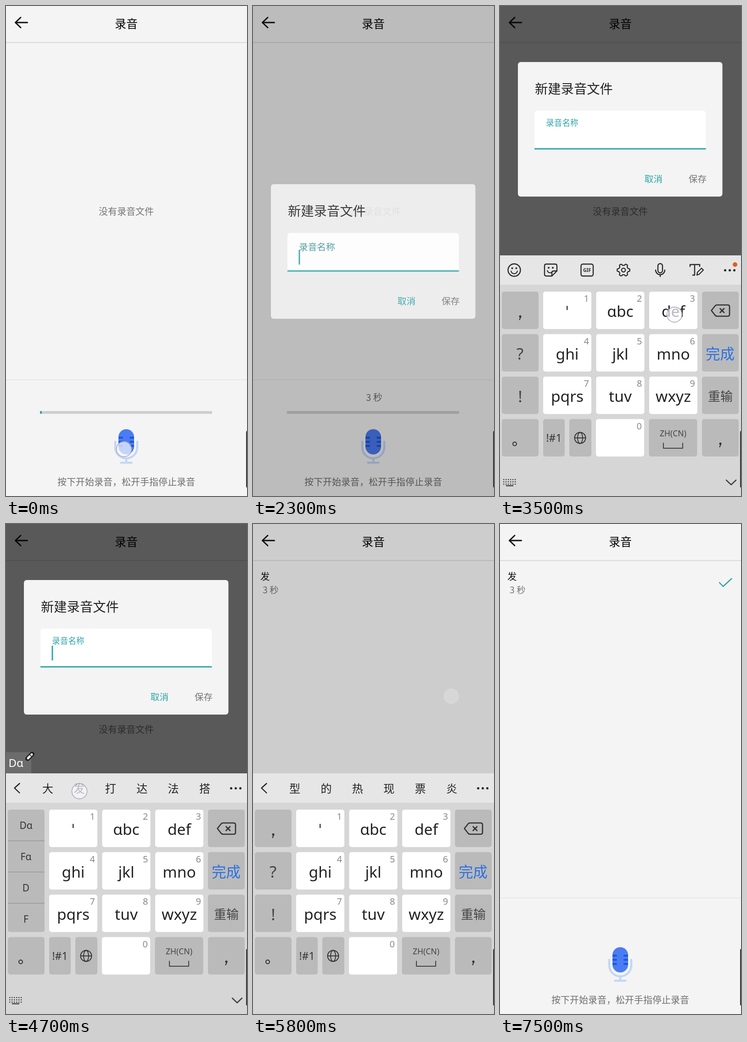
These frames come from a looping animation (525 px wide and 1067 px high, 7800 ms). An HTML page with a canvas:

```html
<!DOCTYPE html>
<html lang="zh-CN">
<head>
<meta charset="utf-8">
<title>录音</title>
<style>
  html, body { margin: 0; width: 100%; height: 100%; overflow: hidden; background: #f4f4f4; }
  canvas { display: block; }
</style>
</head>
<body>
<canvas id="stage" width="525" height="1067"></canvas>
<script>
const g = document.getElementById('stage').getContext('2d');
const LOOP = 7800, STEP = 100;
const TEAL = '#2fa4a9', INK = '#222', GREY = '#757575', PAPER = '#f4f4f4';
const CJK = '"Noto Sans CJK SC", "Noto Sans CJK", sans-serif';
const LATIN = '"Noto Sans", sans-serif';

// Piecewise linear value over time; stops are [time, value].
function track(t, ...stops) {
  if (t <= stops[0][0]) return stops[0][1];
  for (let i = 1; i < stops.length; i++) {
    const [t0, v0] = stops[i - 1], [t1, v1] = stops[i];
    if (t < t1) return v0 + (v1 - v0) * (t - t0) / (t1 - t0);
  }
  return stops[stops.length - 1][1];
}
const within = (t, a, b) => t >= a && t < b;

function rect(x, y, w, h, color) {
  g.fillStyle = color;
  g.fillRect(x, y, w, h);
}
function round(x, y, w, h, r, color) {
  g.beginPath();
  g.roundRect(x, y, w, h, r);
  g.fillStyle = color;
  g.fill();
}
function disc(x, y, r, color) {
  g.beginPath();
  g.arc(x, y, r, 0, 7);
  g.fillStyle = color;
  g.fill();
}
function ring(x, y, r, color, width) {
  g.beginPath();
  g.arc(x, y, r, 0, 7);
  stroke(color, width);
}
function stroke(color, width) {
  g.strokeStyle = color;
  g.lineWidth = width;
  g.stroke();
}
function line(color, width, ...p) {
  g.beginPath();
  for (let i = 0; i < p.length; i += 2) g.lineTo(p[i], p[i + 1]);
  stroke(color, width);
}
// cy is the optical middle of a full-height character
function text(s, x, cy, size, color, align = 'left', font = CJK, weight = 400) {
  g.font = `${weight} ${size}px ${font}`;
  g.textAlign = align;
  g.fillStyle = color;
  g.fillText(s, x, cy + size * 0.38);
}
function faded(alpha, draw) {
  if (alpha <= 0) return;
  g.save();
  g.globalAlpha = alpha;
  draw();
  g.restore();
}

function touch(x, y) {
  disc(x, y, 17, 'rgba(250,250,252,.7)');
  ring(x, y, 16.5, 'rgba(150,148,175,.7)', 1.8);
}

function mic() {
  const pale = '#c3d7f5', dark = '#1f55d8';
  g.beginPath();
  g.moveTo(238, 949);
  g.lineTo(238, 961);
  g.arc(262, 961, 24, Math.PI, 0, true);
  g.lineTo(286, 949);
  stroke(pale, 4.5);
  line(pale, 4.5, 262, 985, 262, 994);
  line(pale, 4.5, 250.5, 994.5, 273.5, 994.5);
  round(245, 921.5, 34, 55, 17, '#4a7cf3');
  for (const y of [940, 949, 958]) {
    round(245, y - 2, 10, 4, [0, 2, 2, 0], dark);
    round(269, y - 2, 10, 4, [2, 0, 0, 2], dark);
  }
}

function screen(t) {
  const saved = t >= 5800;
  rect(0, 0, 525, 1067, PAPER);
  rect(0, 78.5, 525, 2, '#dadada');
  line('#111', 3, 32, 25, 20.5, 36, 32, 47);
  line('#111', 3, 21, 36, 46.5, 36);
  text('录音', 262, 38, 25, '#000', 'center', CJK, 500);
  rect(0, 813, 525, 2, '#e7e7e7');

  if (saved) {
    const glow = track(t, [7000, 0], [7100, .08], [7300, .08], [7500, 0]);
    rect(0, 92, 525, 73, `rgba(0,0,0,${glow})`);
    text('发', 16, 114.5, 20.5, '#111');
    text('3 秒', 21, 144, 19.5, GREY);
    if (t >= 7200) line(TEAL, 2.5, 478, 127.5, 486, 136, 504.5, 119);
  } else {
    text('没有录音文件', 262, 447, 20, GREY, 'center');
    const secs = .64 + Math.min(t, 2200) * .0011;
    if (secs >= 1) text(Math.floor(secs) + ' 秒', 264, 852, 20, '#6e6e6e', 'center');
    rect(74, 882, 375, 6, '#cecece');
    if (t < 2200) rect(74, 882, secs * 6.25, 6, TEAL);
  }
  mic();
  text('按下开始录音，松开手指停止录音', 262, 1036.5, 20, '#6e6e6e', 'center');
}

function dialog(t) {
  const top = track(t, [2400, 388], [2500, 137], [2600, 122]);
  const typed = t >= 4800;
  round(39, top, 445.5, 293, 6, PAPER);
  text('新建录音文件', 76, top + 58, 28.3, INK);
  round(75, top + 106, 373.5, 84, [6, 6, 0, 0], '#fff');
  rect(75, top + 187.5, 373.5, 3, TEAL);
  const k = track(t, [2300, 0], [2400, 1]);
  text('录音名称', 100, top + 137 - 5 * k, 19.7 - 2 * k, k < 1 ? '#3f8f94' : TEAL);
  if (typed) text('发', 100, top + 159, 24, INK);
  const beat = typed ? (t - 4800) % 1000 < 400 || t >= 5600 : (t + 1300) % 1000 < 550;
  if (beat || t < 2700) rect(typed ? 125 : 99.5, top + 143, 3, 32, TEAL);
  text('取消', 334.5, top + 254.5, 19.7, TEAL, 'center');
  text('保存', 430.5, top + 254.5, 19.7, typed ? TEAL : GREY, 'center');
}

function toolIcons() {
  const c = '#2b2b2b', y = 575;
  ring(31, y, 13.5, c, 2.4);
  disc(26.5, y - 4, 2, c);
  disc(35.5, y - 4, 2, c);
  g.beginPath(); g.arc(31, y + 1, 7, .2, 2.94); stroke(c, 2.2);

  g.beginPath();
  g.moveTo(113, y + 13);
  g.lineTo(101, y + 13);
  g.quadraticCurveTo(97, y + 13, 97, y + 9);
  g.lineTo(97, y - 9);
  g.quadraticCurveTo(97, y - 13, 101, y - 13);
  g.lineTo(120, y - 13);
  g.quadraticCurveTo(124, y - 13, 124, y - 9);
  g.lineTo(124, y + 2);
  g.lineTo(113, y + 13);
  g.lineTo(113, y + 6);
  g.quadraticCurveTo(113, y + 2, 117, y + 2);
  g.lineTo(124, y + 2);
  stroke(c, 2.4);
  disc(106, y - 5, 2, c);
  disc(115, y - 5, 2, c);
  g.beginPath(); g.arc(109, y, 6, .8, 2.9); stroke(c, 2.2);

  g.beginPath(); g.roundRect(176.5, y - 13, 26.5, 26, 4); stroke(c, 2.4);
  text('GIF', 189.7, y, 10.5, c, 'center', LATIN, 700);

  g.beginPath();
  for (let i = 0; i <= 64; i++) {
    const a = i * Math.PI / 32, r = 12 + 1.8 * Math.tanh(3 * Math.cos(6 * a));
    g.lineTo(269 + r * Math.cos(a), y + r * Math.sin(a));
  }
  stroke(c, 2.3);
  ring(269, y, 4.2, c, 2.3);

  g.beginPath(); g.roundRect(344, y - 14, 10, 20, 5); stroke(c, 2.4);
  g.beginPath(); g.arc(349, y, 10, 0, Math.PI); stroke(c, 2.4);
  line(c, 2.4, 349, y + 10, 349, y + 14);

  line(c, 2.4, 414, y - 8, 414, y - 12, 435, y - 12, 435, y - 8);
  line(c, 2.4, 424, y - 12, 424, y + 11, 420, y + 11);
  line(c, 2.2, 429, y + 11, 430, y + 5, 439, y - 4, 443, y, 434, y + 9, 429, y + 11);
  disc(512, y - 12, 5, '#dd5f20');
}

function candidates(words) {
  line(INK, 2.4, 29.5, 565, 18.5, 575, 29.5, 585.5);
  [...words].forEach((w, i) => text(w, 91 + 68.4 * i, 575.5, 24, INK, 'center'));
}

function comma(x, y) {
  disc(x, y - 4, 2.5, '#333');
  line('#333', 2, x + 1.2, y - 3, x - 1.5, y + 3);
}

function composing(word) {
  rect(0, 497, 55, 46, '#6c6c6c');
  text(word, 5.5, 519.5, 24, '#fff', 'left', LATIN);
  line('#222', 10, 47, 511, 57, 501);
  line('#eee', 5, 48, 510, 56, 502);
  line('#222', 1.5, 51.5, 502, 56, 506.5);
}

function keys(column) {
  const ROWS = [622, 714.5, 807, 899.5], H = 81.5, DARK = '#bababa';
  const key = (x, row, w, color) => round(x, ROWS[row], w, H, 5, color);
  const letters = ['', 'ɑbc', 'def', 'ghi', 'jkl', 'mno', 'pqrs', 'tuv', 'wxyz'];
  letters.forEach((s, i) => {
    const row = Math.floor(i / 3), x = 94 + 115.5 * (i % 3), y = ROWS[row];
    key(x, row, 105, '#fff');
    text(i + 1, x + 100, y + 14.5, 20, '#8a8a8a', 'right', LATIN);
    text(s, x + 52.5, y + 42.3, 33.5, INK, 'center', LATIN, 500);
  });
  rect(145, 653, 2.4, 9, '#333');

  if (column) {
    round(4, 622, 80, 266.5, 5, DARK);
    column.forEach((s, i) => {
      if (i) rect(4, 621 + 68 * i, 80, 1.5, '#999');
      text(s, 43.5, 656.5 + 67.7 * i, 21, '#333', 'center', LATIN, 500);
    });
  } else {
    for (let r = 0; r < 3; r++) key(4, r, 80, DARK);
    comma(44, 680);
    text('?', 43.5, 756.5, 35, '#444', 'center', LATIN);
    text('!', 44, 849.5, 35, '#444', 'center', LATIN);
  }
  key(4, 3, 80, DARK);
  ring(32, 953.5, 4, '#333', 2);
  key(94, 3, 47, DARK);
  text('!#1', 117.5, 940.5, 23, '#333', 'center', LATIN, 500);
  key(151, 3, 48, DARK);
  ring(174.5, 940.5, 12, '#333', 2);
  g.beginPath(); g.ellipse(174.5, 940.5, 5.5, 12, 0, 0, 7); stroke('#333', 1.8);
  line('#333', 1.8, 163, 940.5, 186, 940.5);
  key(209, 3, 105, '#fff');
  text('0', 309, 914, 20, '#8a8a8a', 'right', LATIN);
  key(324.5, 3, 105, DARK);
  text('ZH(CN)', 377, 930.5, 17.5, '#444', 'center', LATIN);
  line('#444', 2, 356, 952, 356, 963, 398, 963, 398, 952);

  for (let r = 0; r < 4; r++) key(440, r, 80, DARK);
  g.beginPath();
  g.moveTo(460.5, 663);
  g.lineTo(469, 652.5);
  g.quadraticCurveTo(470.5, 651, 473, 651);
  g.lineTo(496, 651);
  g.quadraticCurveTo(500, 651, 500, 655);
  g.lineTo(500, 671.5);
  g.quadraticCurveTo(500, 675.5, 496, 675.5);
  g.lineTo(473, 675.5);
  g.quadraticCurveTo(470.5, 675.5, 469, 674);
  g.closePath();
  stroke('#333', 2.6);
  line('#333', 2.6, 479.5, 659, 488, 667.5);
  line('#333', 2.6, 488, 659, 479.5, 667.5);
  text('完成', 479.5, 757, 31.5, '#2a6fe3', 'center');
  text('重输', 480, 849.5, 27, '#444', 'center');
  comma(480, 957);
}

function keyboard(t) {
  const drop = track(t, [2400, 330], [2500, 5], [2600, 0], [5800, 0], [5900, 300], [6000, 530]);
  const rising = t < 2600;
  const first = within(t, 3600, 4000), second = within(t, 4000, 4800);
  g.save();
  g.translate(0, drop);
  if (first || second) composing(first ? 'D' : 'Dɑ');
  rect(0, 543, 525, 64, rising ? '#e8e1e6' : '#e6e6e6');
  rect(0, 607, 525, 460, '#d6d6d6');
  if (t < 3600) toolIcons();
  else candidates(first ? '的等到大都对' : second ? '大发打达法搭' : '型的热现票炎');
  for (const x of [490.5, 500.5, 510.5]) disc(x, 575.5, 2.5, INK);
  keys(first ? ['D', 'E', 'F', ''] : second ? ['Dɑ', 'Fɑ', 'D', 'F'] : null);
  g.restore();

  if (within(t, 2500, 5800)) {
    const c = rising ? '#8a8a8a' : '#444';
    for (let i = 0; i < 6; i++)
      for (let j = 0; j < 3; j++) rect(7 + 5 * i, 1030 + 5 * j, 2.4, 2.4, c);
    rect(13, 1043.5, 16, 2.4, c);
    line(c, 2.6, 493, 1032.5, 503.5, 1042.5, 514, 1032.5);
  }
}

// [from, to, x, y] of each finger contact
const TOUCHES = [
  [0, 2200, 257, 965], [3500, 3700, 380, 672], [3900, 4100, 266, 672],
  [4700, 4900, 160, 582], [5600, 5800, 432, 375], [7000, 7200, 300, 130]
];

function draw(t) {
  g.lineCap = g.lineJoin = 'round';
  screen(t);
  const dim = track(t, [2200, 0], [2300, .23], [2400, .55], [2500, .635],
                       [5600, .635], [5700, .42], [5800, .16], [5900, 0]);
  rect(0, 0, 525, 1067, `rgba(0,0,0,${dim})`);
  faded(track(t, [2200, 0], [2300, .88], [2400, 1], [5600, 1], [5700, .5], [5800, 0]), () => dialog(t));
  if (within(t, 2400, 6000)) keyboard(t);
  for (const [a, b, x, y] of TOUCHES) if (within(t, a, b)) touch(x, y);
  if (within(t, 5800, 5900)) disc(432, 375, 17, 'rgba(255,255,255,.2)');
  round(523, 925, 6, 124, 3, '#333');
}

function frame(now) {
  draw(Math.floor(now % LOOP / STEP) * STEP);
  requestAnimationFrame(frame);
}
requestAnimationFrame(frame);
</script>
</body>
</html>
```
